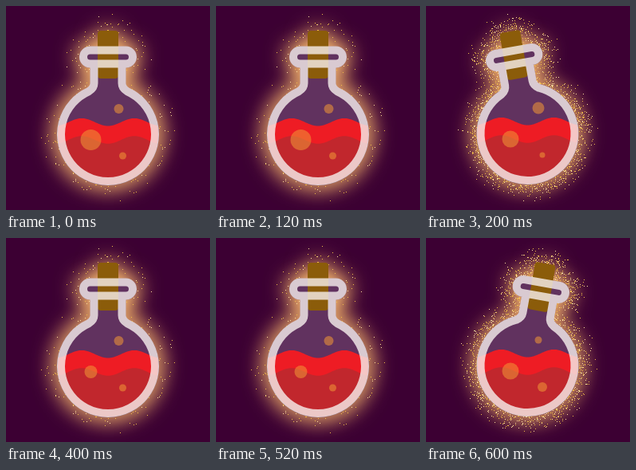
These frames come from a looping animation (256x256 px, 0.8 s). An HTML page with a canvas:

```html
<!DOCTYPE html>
<html>
<head>
<meta charset="utf-8">
<title>Potion</title>
<style>
html, body { margin: 0; height: 100%; overflow: hidden; background: #3c0033; }
canvas { display: block; }
</style>
</head>
<body>
<canvas id="stage" width="256" height="256"></canvas>
<script>
const ctx = document.getElementById('stage').getContext('2d');
const STEP = 200;

// Coordinates are relative to the centre of the bulb.
const glass = new Path2D(
  'M-17.5 -88V-64Q-17.5 -58 -24 -53.9A59 59 0 1 0 24 -53.9Q17.5 -58 17.5 -64V-88');
glass.roundRect(-31, -105.5, 62, 17, 8.5);
const cork = new Path2D();
cork.roundRect(-13, -130, 26, 60, 4);

const poses = [
  { tilt: 0, x: 128, y: 161, bubbles: [13, 6, 4.5], dust: 0.022, fade: 1.2, seed: 7 },
  { tilt: -10, x: 127.5, y: 160, bubbles: [10.5, 7.5, 3.5], dust: 0.2, fade: 1.8, seed: 21 },
  { tilt: 0, x: 128, y: 161, bubbles: [8, 6, 4.5], dust: 0.022, fade: 1.2, seed: 7 },
  { tilt: 10, x: 127.5, y: 160, bubbles: [10.5, 4.5, 6], dust: 0.2, fade: 1.8, seed: 38 }
];
const bubbleSpots = [[-21.5, 7], [13.5, -32], [18.5, 27]];

function random(seed) {
  return () => {
    seed = (seed + 0x6d2b79f5) | 0;
    let t = Math.imul(seed ^ (seed >>> 15), seed | 1);
    t ^= t + Math.imul(t ^ (t >>> 7), t | 61);
    return ((t ^ (t >>> 14)) >>> 0) / 4294967296;
  };
}

// Distance to a rounded box of half size a by b, centred at height c.
function boxDistance(x, y, c, a, b, r) {
  return Math.hypot(Math.max(Math.abs(x) - a, 0), Math.max(Math.abs(y - c) - b, 0)) - r;
}

function flaskDistance(x, y) {
  return Math.min(
    boxDistance(x, y, 0, 0, 0, 64),
    boxDistance(x, y, -95, 13, 35, 0),
    boxDistance(x, y, -97, 23, 0, 13.5));
}

function drawDust(pose, angle) {
  const next = random(pose.seed), c = Math.cos(angle), s = Math.sin(angle);
  for (let py = 6; py < 250; py++) {
    for (let px = 36; px < 220; px++) {
      const roll = next(), x = px - pose.x, y = py - pose.y;
      const d = flaskDistance(x * c + y * s, y * c - x * s);
      if (d < 0 || d > 26) continue;
      if (roll < pose.dust * (1 - d / 26) ** pose.fade) {
        ctx.fillStyle = next() < 0.6 ? '#f0bd48' : '#ffe0a0';
        ctx.fillRect(px, py, 1, 1);
      }
    }
  }
}

function drawBody(rim) {
  ctx.fillStyle = ctx.strokeStyle = '#61325f';
  ctx.lineWidth = rim;
  ctx.fill(glass);
  ctx.stroke(glass);
  ctx.fillStyle = '#8b5c0a';
  ctx.fill(cork);
}

// The body is painted off stage so that only its shadow shows.
function drawGlow(pose, angle) {
  ctx.save();
  ctx.translate(pose.x - 1000, pose.y);
  ctx.rotate(angle);
  ctx.shadowColor = 'rgb(250, 185, 110)';
  ctx.shadowOffsetX = 1000;
  ctx.shadowBlur = 28;
  drawBody(16);
  ctx.restore();
}

function drawWave(level, height, color) {
  ctx.fillStyle = color;
  ctx.beginPath();
  ctx.moveTo(-64, 64);
  for (let x = -64; x <= 64; x++) {
    ctx.lineTo(x, level + height * Math.cos(x * Math.PI / 33));
  }
  ctx.lineTo(64, 64);
  ctx.fill();
}

function drawLiquid(radii) {
  ctx.save();
  ctx.beginPath();
  ctx.arc(0, 0, 63, 0, 7);
  ctx.clip();
  drawWave(-15.3, 4.8, '#ee1c24');
  drawWave(7, 4.8, '#c1272d');
  ctx.fillStyle = 'rgba(240, 150, 55, 0.56)';
  bubbleSpots.forEach(([x, y], i) => {
    ctx.beginPath();
    ctx.arc(x, y, radii[i], 0, 7);
    ctx.fill();
  });
  ctx.restore();
}

function draw(pose) {
  const angle = pose.tilt * Math.PI / 180;
  ctx.fillStyle = '#3c0033';
  ctx.fillRect(0, 0, 256, 256);
  drawGlow(pose, angle);
  drawDust(pose, angle);

  ctx.save();
  ctx.translate(pose.x, pose.y);
  ctx.rotate(angle);
  drawBody(9.6);
  ctx.rotate(-angle);
  drawLiquid(pose.bubbles);
  ctx.rotate(angle);
  ctx.strokeStyle = 'rgba(248, 240, 238, 0.8)';
  ctx.lineWidth = 10;
  ctx.stroke(glass);
  ctx.restore();
}

let shown = -1;
const start = performance.now();
function tick() {
  const index = Math.floor((performance.now() - start) / STEP) % poses.length;
  if (index !== shown) draw(poses[shown = index]);
  requestAnimationFrame(tick);
}
tick();
</script>
</body>
</html>
```
